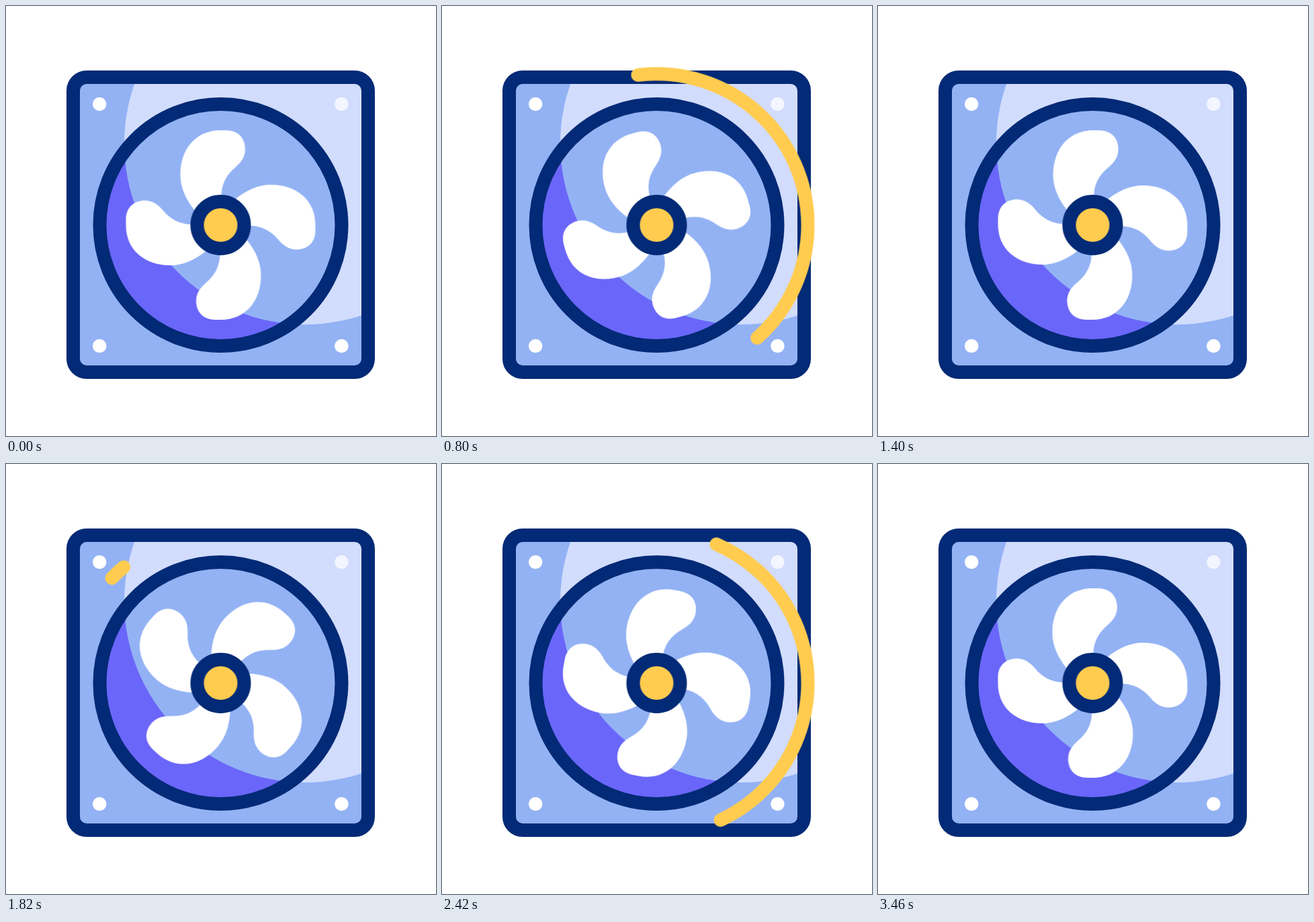
An HTML page without scripts that plays this animation: 640 px wide and 640 px high, repeating every 3.6 s.

```html
<!DOCTYPE html>
<html lang="en">
<head>
<meta charset="utf-8">
<title>Fan</title>
<style>
  html, body { margin: 0; width: 100%; height: 100%; overflow: hidden; background: #fff; }
  svg { display: block; width: 100vw; height: 100vh; }
  .line { stroke: #032a76; stroke-width: 20; }

  .fan { animation: spin 3.6s infinite; }
  .sweep {
    fill: none; stroke: #ffcc50; stroke-width: 20; stroke-linecap: round;
    animation: sweep 3.6s linear infinite, show 3.6s step-end infinite;
  }

  /* five turns, speeding up to the middle and slowing down again */
  @keyframes spin {
    0%, 3.333% { transform: rotate(0deg); animation-timing-function: cubic-bezier(.333, .168, .667, .496); }
    12.778% { transform: rotate(54deg); animation-timing-function: cubic-bezier(.333, .246, .667, .569); }
    22.222% { transform: rotate(164.5deg); animation-timing-function: cubic-bezier(.333, .224, .667, .558); }
    38.889% { transform: rotate(540deg); animation-timing-function: cubic-bezier(.333, .291, .667, .702); }
    58.333% { transform: rotate(1205deg); animation-timing-function: cubic-bezier(.333, .438, .667, .789); }
    78.333% { transform: rotate(1670.3deg); animation-timing-function: cubic-bezier(.333, .674, .667, 1); }
    96.111%, 100% { transform: rotate(1800deg); }
  }

  /* dash length and tail position, in degrees along the circle */
  @keyframes sweep {
    0%, 4.17% { stroke-dasharray: 0 400; stroke-dashoffset: 0; animation-timing-function: cubic-bezier(.4, .1, .7, .7); }
    12.778% { stroke-dasharray: 68.2 400; stroke-dashoffset: -4.2; }
    22.222% { stroke-dasharray: 145.6 400; stroke-dashoffset: -40.5; }
    27.778% { stroke-dasharray: 128 400; stroke-dashoffset: -108; }
    33.05% { stroke-dasharray: 0 400; stroke-dashoffset: -238; animation-timing-function: step-end; }
    48.889% { stroke-dasharray: 0 400; stroke-dashoffset: 0; animation-timing-function: cubic-bezier(.4, .1, .7, .7); }
    58.333% { stroke-dasharray: 77.1 400; stroke-dashoffset: -24.8; }
    67.778% { stroke-dasharray: 135 400; stroke-dashoffset: -74; }
    72.222% { stroke-dasharray: 108 400; stroke-dashoffset: -128; }
    77.778%, 100% { stroke-dasharray: 0 400; stroke-dashoffset: -238; }
  }
  @keyframes show {
    0% { opacity: 0; }
    4.17% { opacity: 1; }
    33.05% { opacity: 0; }
    48.889% { opacity: 1; }
    77.778%, 100% { opacity: 0; }
  }
</style>
</head>
<body>
<svg viewBox="0 0 640 640">
  <defs>
    <clipPath id="panel"><rect x="100" y="106" width="439" height="439" rx="20"/></clipPath>
    <clipPath id="duct"><circle cx="319.5" cy="326" r="180"/></clipPath>
    <circle id="light" cx="445" cy="205" r="269"/>
    <path id="blade" d="M0 0 L-38 -21 C-52 -38 -60 -56 -60 -75 C-60 -112 -38 -141 0 -141 H8 C28 -141 36.5 -127 36.5 -113 C36.5 -101 30 -93 22 -86 C9 -75 1 -62 1 -42 Z"/>
  </defs>

  <g clip-path="url(#panel)">
    <rect x="90" y="96" width="459" height="459" fill="#93b2f4"/>
    <use href="#light" fill="#d2dcfd"/>
  </g>
  <rect class="line" x="100" y="106" width="439" height="439" rx="20" fill="none"/>

  <g fill="#fff">
    <circle cx="139.2" cy="146" r="10.2"/>
    <circle cx="499.4" cy="146" r="10.2" fill="#f4f6ff"/>
    <circle cx="139.2" cy="506" r="10.2"/>
    <circle cx="499.4" cy="506" r="10.2"/>
  </g>

  <g clip-path="url(#duct)">
    <circle cx="319.5" cy="326" r="180" fill="#6a66f9"/>
    <use href="#light" fill="#93b2f4"/>
  </g>
  <circle class="line" cx="319.5" cy="326" r="180" fill="none"/>

  <g transform="translate(319.5 326)">
    <g class="fan" fill="#fff">
      <use href="#blade"/>
      <use href="#blade" transform="rotate(90)"/>
      <use href="#blade" transform="rotate(180)"/>
      <use href="#blade" transform="rotate(270)"/>
    </g>
    <circle class="line" r="35" fill="#ffcc50"/>
    <circle class="sweep" r="225" pathLength="360" transform="rotate(-138)"/>
  </g>
</svg>
</body>
</html>
```
